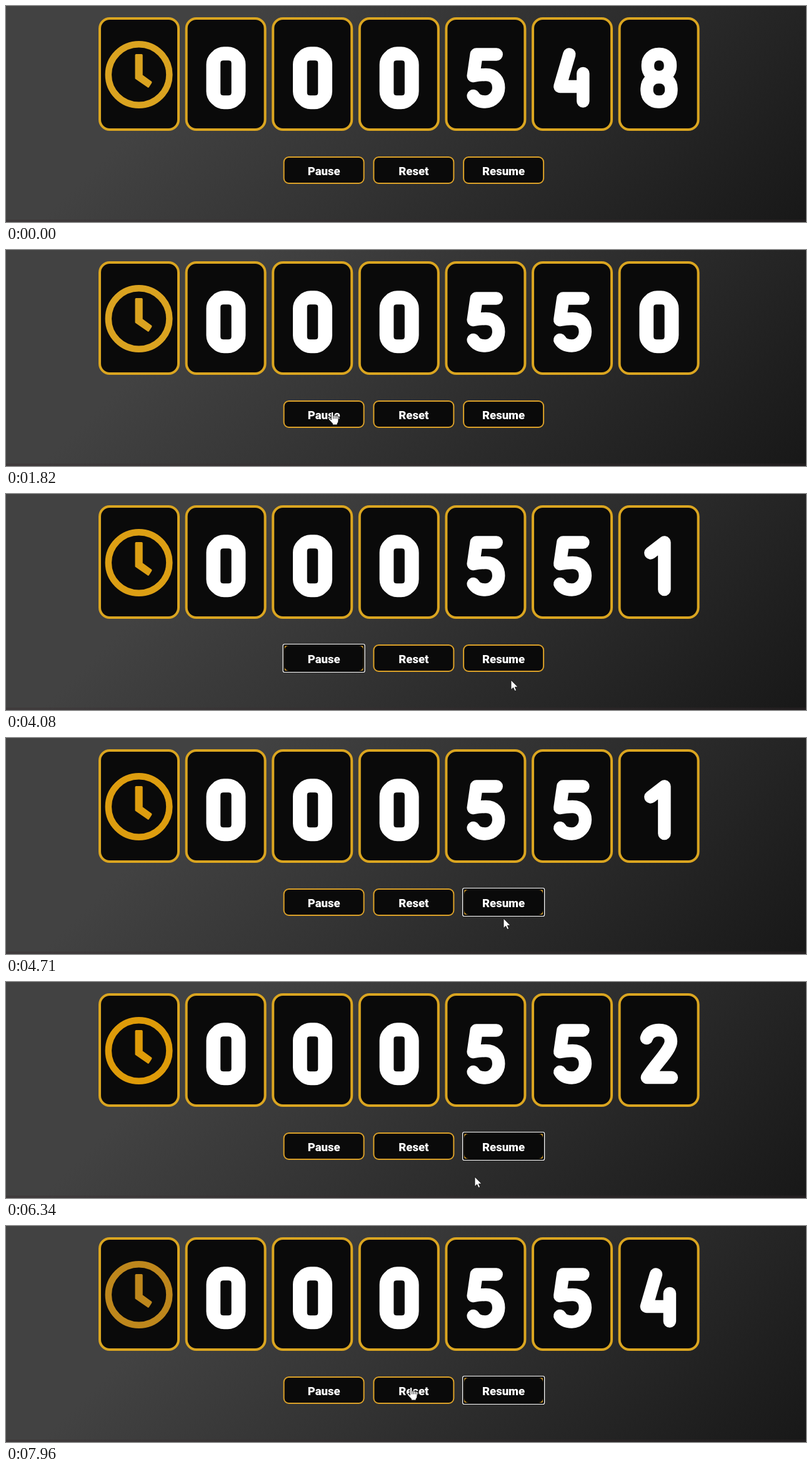
An HTML page that plays this animation: 1280x346 px, repeating every 8 s.

```html
<!DOCTYPE html>
<html lang="en">
<head>
<meta charset="utf-8">
<title>Stopwatch</title>
<style>
  html, body { margin: 0; width: 100%; height: 100%; overflow: hidden; background: #333; }
  svg { display: block; width: 100vw; height: 100vh; }
  .card { fill: #0a0a0a; stroke: #daa520; stroke-width: 4; }
  .button { fill: #0a0a0a; stroke: #daa028; stroke-width: 2; }
  .label { font: 900 18.5px Roboto, "Open Sans", sans-serif; fill: #fff; text-anchor: middle; }
  .digit { fill: none; stroke: #fff; stroke-width: 20.5; stroke-linecap: round; stroke-linejoin: round; }
  .cursor { fill: #fff; stroke: #111; stroke-width: .9; stroke-linejoin: round; }
</style>
</head>
<body>
<svg viewBox="0 0 1280 346" preserveAspectRatio="none">
  <defs>
    <linearGradient id="shade" gradientUnits="userSpaceOnUse" x1="200" y1="200" x2="813" y2="813">
      <stop stop-color="#424242"/>
      <stop offset="1" stop-color="#181818"/>
    </linearGradient>
  </defs>
  <rect width="1280" height="346" fill="url(#shade)"/>
  <rect y="342" width="1280" height="4" fill="#3a2c30" opacity=".3"/>
  <g id="cards"></g>
  <g id="clock" transform="translate(212.6 110) scale(.2177)">
    <circle r="224" fill="none" stroke="currentColor" stroke-width="48"/>
    <path fill="currentColor" stroke="currentColor" stroke-width="16" stroke-linejoin="round"
      d="M-20-144H20V6L88 56 68 87-20 26Z"/>
  </g>
  <g id="digits"></g>
  <g id="buttons"></g>
  <g id="focus" fill="none">
    <rect x="1" y="1" width="128" height="42" rx="2" stroke="#0c0c0c" stroke-width="2.4"/>
    <rect x="-.5" y="-.5" width="131" height="45" rx="2.5" stroke="#fff" stroke-width="1.2"/>
  </g>
  <path id="arrow" class="cursor" d="M0 0V15.6L3.6 12.2 6 17.6 8.6 16.4 6.3 11.3H11Z"/>
  <g id="hand" class="cursor">
    <path d="M-1.6 13V2a1.6 1.6 0 0 1 3.2 0V7a1.4 1.4 0 0 1 2.8 .4a1.4 1.4 0 0 1 2.8 .6a1.3 1.3 0 0 1 2.7 .8V14Q10 17 8 19V21H.5V19L-5.4 12.8A1.5 1.5 0 0 1-3.2 10.8Z"/>
    <path fill="none" d="M1.6 7V11.5M4.4 7.5V11.5M7.2 8V11.5"/>
  </g>
</svg>
<script>
const LOOP = 8000, SECOND = 1000;
const PAUSED = 2740, RESUMED = 4480;
const START_COUNT = 548, FIRST_TICK = 510;

const CARD = { x: 150, pitch: 138.6, count: 7 };
const BUTTON = { x: 443.6, y: 241, w: 130, h: 44, pitch: 143.75 };
const LABELS = ["Pause", "Reset", "Resume"];

const GOLD = [218, 163, 32], AMBER = [222, 155, 9], DIM = [190, 135, 28];

// A closed upright loop, centred on x = 0.
const loop = (w, top, bottom, r) =>
  `M${-w / 2} ${top + r}a${r} ${r} 0 0 1 ${r} ${-r}h${w - 2 * r}a${r} ${r} 0 0 1 ${r} ${r}` +
  `V${bottom - r}a${r} ${r} 0 0 1 ${-r} ${r}h${2 * r - w}a${r} ${r} 0 0 1 ${-r} ${-r}Z`;

// Centre lines of the digits, drawn with a thick round pen.
const BOWL = "C14 43 20.5 52 20.5 64S11 86.5-1 86.5-17 82-20 77";
const DIGITS = {
  0: loop(42.5, 10, 86.5, 17) + loop(38, 8.5, 88, 16),
  1: "M-13.5 27.5L8.5 10.5V86",
  2: "M-20 23C-17 13-8 10 0 10C13 10 19 18 19 28C19 42-4 62-19 86H20",
  3: "M-20 10.5H16L0 43" + BOWL,
  4: "M-5 10.5L-20 62H17M17 41V85.5",
  5: "M17 10.5H-15L-20 45Q-10 43 0 43" + BOWL,
  8: loop(36, 10, 47, 17) + loop(39, 47, 86.5, 18),
  9: loop(39, 10, 51, 18) + "M19.5 30C20 62 14 80-8 86"
};

// Each pointer move eases to x, y and then rests.
const ENTER = { at: 450, x: 1154, y: 346 };
const MOVES = [
  { end: 900, ms: 450, x: 1062, y: 304 },
  { end: 1500, ms: 600, x: 556, y: 287 },
  { end: 1590, ms: 90, x: 522, y: 259 },
  { end: 3500, ms: 190, x: 560, y: 292 },
  { end: 4080, ms: 500, x: 808, y: 298 },
  { end: 4330, ms: 250, x: 815, y: 266 },
  { end: 4870, ms: 320, x: 778, y: 312 },
  { end: 7110, ms: 1240, x: 690, y: 312 },
  { end: 7650, ms: 540, x: 648, y: 258 }
];

const $ = id => document.getElementById(id);
const ramp = (t, from, to) => Math.min(1, Math.max(0, (t - from) / (to - from)));
const ease = k => k * k * (3 - 2 * k);
const lerp = (a, b, k) => a + (b - a) * k;
const mix = (a, b, k) => a.map((v, i) => lerp(v, b[i], k));

function add(parent, tag, attrs, text = "") {
  const node = document.createElementNS("http://www.w3.org/2000/svg", tag);
  for (const key in attrs) node.setAttribute(key, attrs[key]);
  node.textContent = text;
  return parent.appendChild(node);
}

const digits = [];
for (let i = 0; i < CARD.count; i++) {
  const x = CARD.x + i * CARD.pitch;
  add($("cards"), "rect", { class: "card", x, y: 20, width: 126, height: 178, rx: 16 });
  if (i) digits.push(add($("digits"), "path", { class: "digit", transform: `translate(${x + 63.3} 67)` }));
}

const buttonX = i => BUTTON.x + i * BUTTON.pitch;
LABELS.forEach((label, i) => {
  const x = buttonX(i);
  add($("buttons"), "rect", { class: "button", x: x + 1, y: BUTTON.y + 1, width: BUTTON.w - 2, height: BUTTON.h - 2, rx: 8 });
  add($("buttons"), "text", { class: "label", x: x + BUTTON.w / 2, y: 271 }, label);
});

function countAt(t) {
  const before = Math.floor((Math.min(t, PAUSED) - FIRST_TICK) / SECOND) + 1;
  const after = Math.max(0, Math.floor((t - RESUMED) / SECOND));
  return START_COUNT + before + after;
}

function pointerAt(t) {
  let { x, y } = ENTER;
  for (const move of MOVES) {
    const k = ease(ramp(t, move.end - move.ms, move.end));
    x = lerp(x, move.x, k);
    y = lerp(y, move.y, k);
  }
  return [Math.round(x), Math.round(y)];
}

function show(node, visible, x, y) {
  node.setAttribute("visibility", visible ? "visible" : "hidden");
  node.setAttribute("transform", `translate(${x} ${y})`);
}

function render(t) {
  const text = String(countAt(t)).padStart(digits.length, "0");
  digits.forEach((digit, i) => digit.setAttribute("d", DIGITS[text[i]]));

  const warm = mix(GOLD, AMBER, ramp(t, PAUSED, 5410));
  $("clock").style.color = `rgb(${mix(warm, DIM, ramp(t, 7920, 7960)).map(Math.round)})`;
  show($("focus"), t >= PAUSED, buttonX(t < RESUMED ? 0 : 2), BUTTON.y);

  const [x, y] = pointerAt(t);
  const over = y > BUTTON.y && y < BUTTON.y + BUTTON.h &&
    LABELS.some((_, i) => x > buttonX(i) && x < buttonX(i) + BUTTON.w);
  show($("arrow"), t >= ENTER.at && !over, x, y);
  show($("hand"), t >= ENTER.at && over, x, y);
}

const start = performance.now();
function frame() {
  render((performance.now() - start) % LOOP);
  requestAnimationFrame(frame);
}
frame();
</script>
</body>
</html>
```
